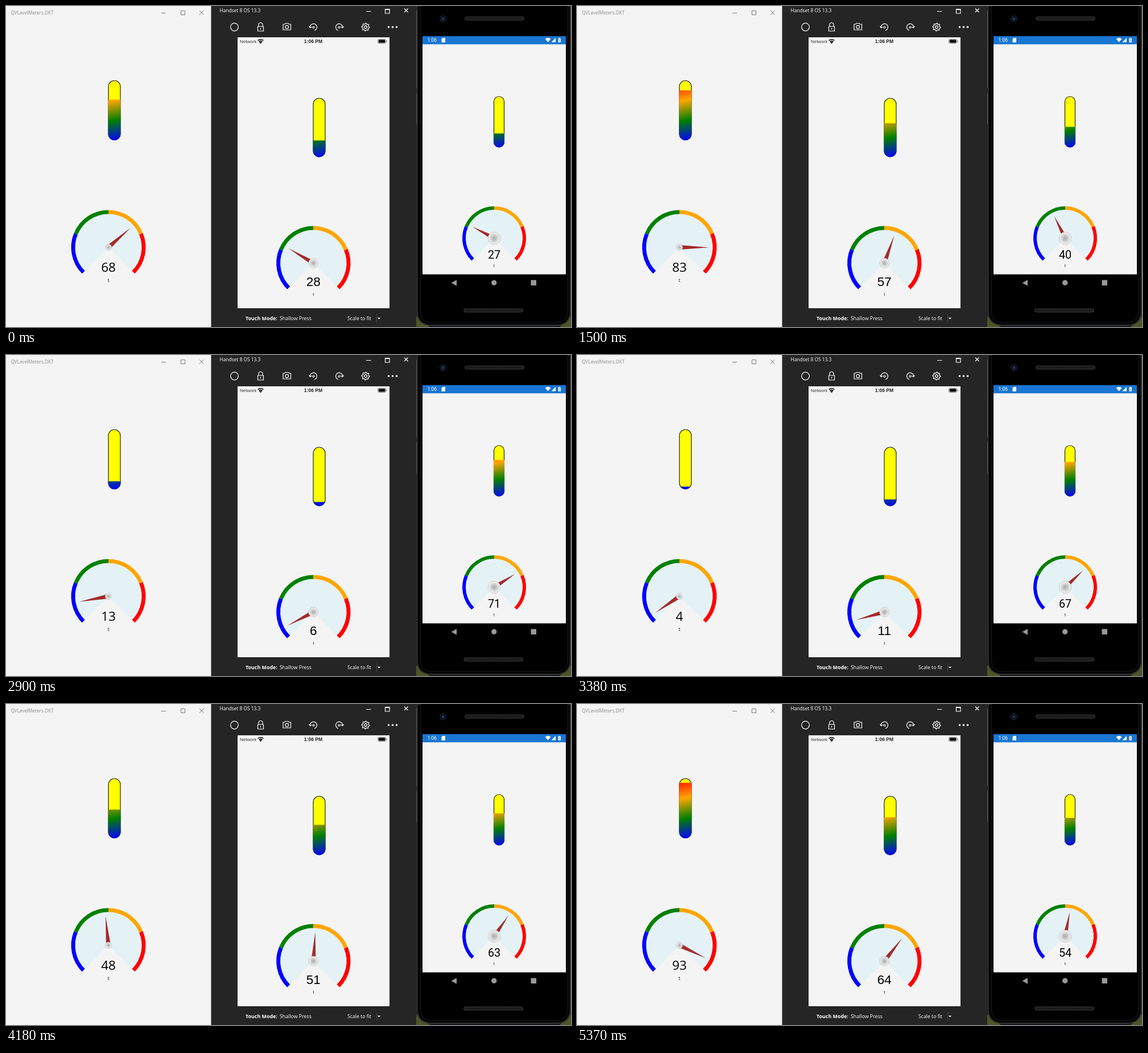
An HTML page that plays this animation: 993 px wide and 564 px high, repeating every 5470 ms.

```html
<!DOCTYPE html>
<html lang="en">
<head>
<meta charset="utf-8">
<title>Gauges</title>
<style>
  html, body { margin: 0; width: 100%; height: 100%; overflow: hidden; background: #f4f4f4; }
  svg { display: block; width: 993px; height: 564px; }
  .ui { font-family: "Open Sans", "Noto Sans", sans-serif; }
  .arial { font-family: "Liberation Sans", Arial, sans-serif; }
  .robo { font-family: Roboto, sans-serif; }
  .line { fill: none; stroke: #fff; stroke-width: 1.2; }
  .mid { text-anchor: middle; }
</style>
</head>
<body>
<svg id="stage" viewBox="0 0 993 564">
  <defs>
    <radialGradient id="hub">
      <stop offset="0" stop-color="#aaa"/>
      <stop offset=".3" stop-color="#c0c0c0"/>
      <stop offset="1" stop-color="#f7f7f7"/>
    </radialGradient>
  </defs>

  <!-- desktop window -->
  <rect width="361" height="564" fill="#f4f4f4"/>
  <text class="ui" x="8.5" y="15" font-size="8.2" fill="#8c8c8c">QVLevelMeters.DKT</text>
  <path d="M273 12.5h8M307.5 8.5h7v7h-7zM340 8l7.500 7.500M347.500 8l-7.500 7.500" fill="none" stroke="#777"/>

  <!-- simulator -->
  <rect x="360.500" width="360.500" height="564" fill="#252525"/>
  <text class="ui" x="375.500" y="11" font-size="8.400" fill="#fff">Handset 8 OS 13.3</text>
  <g class="line">
    <path d="M633 9.500h8.500M666.500 5.500h7.500v7.500h-7.500zM666 6.500h8.500M700 4.500l6.500 6.500M706.500 4.500l-6.500 6.500"/>
    <circle cx="401.500" cy="37" r="6.800"/>
    <path d="M442.500 36h10v8h-10zM444 36v-3a3.500 3.500 0 0 1 7 0v3M447.500 38.500v3"/>
    <path d="M487 32h3l1-1.500h5l1 1.500h3.500v10h-13.500z"/>
    <circle cx="493.800" cy="37" r="2.800"/>
    <g id="turn">
      <path d="M534.500 38a6 6 0 1 1 7.500 5M532.500 35.500l2 3 3-2"/>
      <circle cx="540.500" cy="37.500" r="1.500"/>
    </g>
    <use href="#turn" transform="matrix(-1 0 0 1 1126 0)"/>
    <circle cx="632" cy="37" r="2.300"/>
    <path id="gear" stroke-linejoin="round"/>
  </g>
  <path d="M672.500 37h.01M679.500 37h.01M686.500 37h.01" stroke="#fff" stroke-width="3.600" stroke-linecap="round"/>
  <rect x="407" y="55" width="267" height="476" fill="#f4f4f4"/>
  <text class="arial" x="411" y="65.300" font-size="8" fill="#333">Network</text>
  <g fill="none" stroke="#111" stroke-width="1.600">
    <path d="M442.500 60.700q5-4 10 0M444.600 62.800q2.900-2.400 5.800 0"/>
    <path d="M446.500 64h2l-1 1.200z"/>
  </g>
  <text class="arial mid" x="540" y="65.300" font-size="8.600" font-weight="700" fill="#222">1:06 PM</text>
  <rect x="653.500" y="58.500" width="14" height="7" rx="2" fill="none" stroke="#777"/>
  <rect x="654.800" y="59.500" width="11.500" height="5" rx="1" fill="#000"/>
  <path d="M669 60.500v3" stroke="#777"/>
  <g class="ui" fill="#fff">
    <text x="421" y="552" font-size="8.900" font-weight="700">Touch Mode:</text>
    <text x="481" y="552" font-size="8.800">Shallow Press</text>
    <text x="600" y="552" font-size="8.700">Scale to fit</text>
  </g>
  <path d="M651.500 541v16" stroke="#444"/>
  <path class="line" d="M653.500 547.500l2 2 2-2"/>

  <!-- handset -->
  <rect x="721" width="272" height="564" fill="#15191d"/>
  <path d="M721 545v19h24zM993 545v19h-20z" fill="#4d5526"/>
  <path d="M722.500 0V536q0 25 26 25H966q26 0 26-25V0z" fill="#050505" stroke="#333" stroke-width="2"/>
  <path d="M728.500 0V535q0 21 20 21H966q21 0 21-21V0" fill="#000" stroke="#1c1c1c"/>
  <path d="M721.500 8v136M721.500 153v55" stroke="#555"/>
  <circle cx="768" cy="22.500" r="5.500" fill="#0c1122" stroke="#20232c"/>
  <circle cx="768" cy="22.500" r="2" fill="#24427c"/>
  <g fill="#252525" stroke="#333">
    <rect x="806.500" y="19" width="104" height="6" rx="3"/>
    <rect x="804.500" y="532" width="104" height="6" rx="3"/>
  </g>
  <g stroke="#111" stroke-width="4" stroke-dasharray="1.500 1.500">
    <path d="M809 22h99M807 535h99"/>
  </g>
  <rect x="732" y="53" width="252" height="418.500" fill="#f4f4f4"/>
  <rect x="732" y="53" width="252" height="14.300" fill="#1976d2"/>
  <g fill="#fff">
    <text class="robo" x="740.500" y="63.200" font-size="8.600">1:06</text>
    <path d="M765.500 58l2-2h4.500v8h-6.500zM947.500 58q5-4 10 0l-5 5.500zM966 56v7.500h-7.500zM970.500 57h1.200v-1h2v1h1.200v6.700h-4.400z"/>
  </g>
  <path d="M972.700 58.500v3" stroke="#1976d2"/>
  <g fill="#999">
    <path d="M782.500 486.500l9.500-5.300v10.600zM922.500 481.500h9.500v9.500h-9.500z"/>
    <circle cx="857.700" cy="486.300" r="4.700"/>
  </g>
</svg>
<script>
const stage = document.getElementById("stage");
const LOOP = 5470, LAST = 5370;

// levels: turning points; times: when each one is reached
const panels = [
  { cx: 180, cy: 424, r: 65.5, band: 7, needle: 52, hub: 5.5, font: "ui", size: 22.5, numY: 467, unitY: 485, unit: 9,
    bar: [180, 131, 21, 104.5], levels: [66.9, 83.4, 3.5, 97, 10], times: [-300, 1500, 3300, 5120, 6920] },
  { cx: 540.3, cy: 451.7, r: 65.2, band: 7, needle: 51.5, hub: 8.5, font: "arial", size: 22.5, numY: 492, unitY: 508.5, unit: 8,
    bar: [540, 162, 21, 103], levels: [22.3, 59, 5.5, 69, 48], times: [-450, 1300, 3050, 4800, 6550] },
  { cx: 858, cy: 408, r: 56, band: 6, needle: 43.5, hub: 10.8, font: "robo", size: 19.8, numY: 444.3, unitY: 458.5, unit: 7,
    bar: [857.5, 159, 18, 89], levels: [49.8, 15, 73, 62.8, 51.1], times: [-1050, 700, 2450, 4200, 5950] }
];

function add(tag, attrs, parent = stage) {
  const el = document.createElementNS("http://www.w3.org/2000/svg", tag);
  for (const key in attrs) el.setAttribute(key, attrs[key]);
  return parent.appendChild(el);
}

function arc(p, r, from, to) {
  const at = v => {
    const a = (135 + 2.7 * v) * Math.PI / 180;
    return `${p.cx + r * Math.cos(a)} ${p.cy + r * Math.sin(a)}`;
  };
  return `M${at(from)}A${r} ${r} 0 ${to - from > 66 ? 1 : 0} 1 ${at(to)}`;
}

function buildBar(p, i) {
  const [x, y, w, h] = p.bar;
  const shape = { x, y, width: w, height: h, rx: w / 2 };
  const grad = add("linearGradient", { id: "heat" + i, gradientUnits: "userSpaceOnUse", x1: x + w, y1: y + h, x2: x, y2: y });
  ["blue", "green", "orange", "red"].forEach((c, k) => add("stop", { offset: k / 3, "stop-color": c }, grad));
  const clip = add("clipPath", { id: "level" + i });
  p.level = add("rect", { x: x - 1, width: w + 2, height: h + 2 }, clip);
  add("rect", { ...shape, fill: "#ff0", stroke: "#222", "stroke-width": 1.2 });
  add("rect", { ...shape, fill: `url(#heat${i})`, stroke: `url(#heat${i})`, "clip-path": `url(#level${i})` });
}

function buildGauge(p) {
  add("path", { d: arc(p, p.r - p.band, 0, 100) + `L${p.cx} ${p.cy}z`, fill: "#e4f2f6" });
  ["blue", "green", "orange", "red"].forEach((c, k) =>
    add("path", { d: arc(p, p.r - p.band / 2, k * 25, k * 25 + 25), fill: "none", stroke: c, "stroke-width": p.band }));
  p.hand = add("path", { d: `M0-4L${p.needle} 0 0 4z`, fill: "#a52a2a" });
  add("circle", { cx: p.cx, cy: p.cy, r: p.hub, fill: "url(#hub)", stroke: "#bbb", "stroke-width": .8 });
  p.number = add("text", { class: p.font + " mid", x: p.cx, y: p.numY, "font-size": p.size });
  add("text", { class: p.font + " mid", x: p.cx, y: p.unitY, "font-size": p.unit, fill: "#222" }).textContent = "t";
}

function valueAt(p, t) {
  const i = p.times.findIndex(end => t < end);
  const start = p.times[i - 1], from = p.levels[i - 1];
  const u = (t - start) / (p.times[i] - start);
  return from + (p.levels[i] - from) * (1 - Math.cos(Math.PI * u)) / 2;
}

function draw(now) {
  let t = Math.min(now % LOOP, LAST);
  if (t > 5020 && t < 5110) t = 5020; // short stall before the turn
  for (const p of panels) {
    const v = valueAt(p, t);
    p.level.setAttribute("y", p.bar[1] + p.bar[3] * (1 - v / 100));
    p.hand.setAttribute("transform", `translate(${p.cx} ${p.cy}) rotate(${135 + 2.7 * v})`);
    p.number.textContent = Math.round(v);
  }
}

let teeth = "";
for (let k = 0; k < 32; k++) {
  const r = k % 4 < 2 ? 6.9 : 5.2, a = k * Math.PI / 16;
  teeth += `${k ? "L" : "M"}${632 + r * Math.cos(a)} ${37 + r * Math.sin(a)}`;
}
document.getElementById("gear").setAttribute("d", teeth + "z");

panels.forEach((p, i) => { buildBar(p, i); buildGauge(p); });

const begin = performance.now();
function tick() {
  draw(performance.now() - begin);
  requestAnimationFrame(tick);
}
tick();
</script>
</body>
</html>
```
